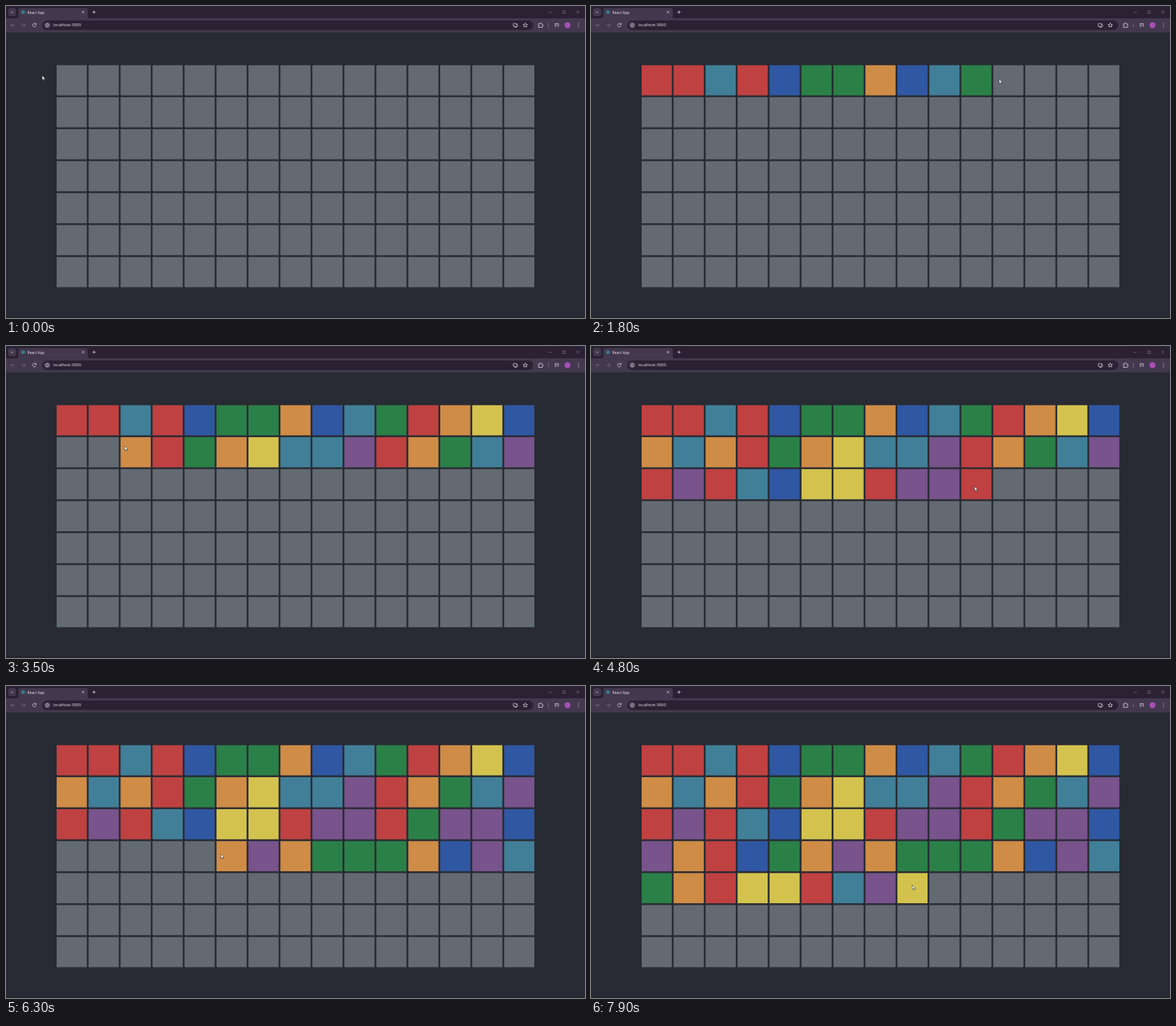
Animation of 800 by 431 pixels, one loop 8 s. Source, as an HTML page:

```html
<!DOCTYPE html>
<html lang="en">
<head>
<meta charset="utf-8">
<title>Hover grid</title>
<style>
  html, body { margin: 0; height: 100%; overflow: hidden; background: #282b33; }
  svg { display: block; width: 100vw; height: 100vh; }
  text { font-family: "Open Sans", "Noto Sans", sans-serif; fill: #efeaf2; }
  .icon { fill: none; stroke: #d6cfdc; stroke-width: .8; }
  .dim { stroke: #776d82; }
</style>
</head>
<body>
<svg viewBox="0 0 800 431">
  <rect width="800" height="431" fill="#282b33"/>
  <rect y="428.5" width="800" height="2.5" fill="#23262e"/>

  <!-- Browser window -->
  <rect width="800" height="18" fill="#2a2133"/>
  <rect y="17" width="800" height="19.5" fill="#43394f"/>
  <path d="M14 17Q17 17 17 14V6Q17 3 20 3H110Q113 3 113 6V14Q113 17 116 17Z" fill="#43394f"/>
  <rect x="3" y="3" width="11" height="11" rx="3" fill="#43394f"/>
  <path class="icon" d="M6.8 7.8l1.7 1.7 1.7-1.7"/>
  <circle cx="23.5" cy="8.5" r="2.6" fill="#37798c"/>
  <text x="29.6" y="10.5" font-size="5">React App</text>
  <path class="icon" d="M105 6.9l3.2 3.2m0-3.2l-3.2 3.2M119.3 8.5h4.6m-2.3-2.3v4.6"/>
  <path class="icon dim" d="M750 8.8h4M769.3 6.8h3.6v3.6h-3.6zM788.2 6.6l3.8 3.8m0-3.8l-3.8 3.8"/>
  <path class="icon dim" d="M12 26.5H7m2.3-2.3L7 26.5l2.3 2.3M21.5 26.5h5m-2.3-2.3l2.3 2.3-2.3 2.3"/>
  <path class="icon" d="M41.2 25.2a2.4 2.4 0 1 0 .2 2M41.6 23.7v1.8h-1.9"/>
  <rect x="50" y="20" width="678.5" height="13.2" rx="6.6" fill="#2a2133"/>
  <circle cx="57" cy="26.5" r="4.8" fill="#43394f"/>
  <circle class="icon" cx="57" cy="26.5" r="2.3"/>
  <path class="icon" d="M57 26.2v1.4M57 25v.6"/>
  <text x="65.3" y="28.4" font-size="5.7">localhost:3000</text>
  <path class="icon" d="M704 24.2h-3v4h6v-1.7M702.7 29.5h2.8M705.6 23.5v2.7m-1.3-1.2l1.3 1.2 1.3-1.2"/>
  <path class="icon" d="M717.5 23.4l.9 2 2.1.2-1.6 1.4.5 2.1-1.9-1.1-1.9 1.1.5-2.1-1.6-1.4 2.1-.2z"/>
  <path class="icon" d="M735.7 24.6h1.7q0-1.4 1-1.4t1 1.4h1.6v1.5q1.3 0 1.3 1t-1.3 1v1.4h-5.3v-1.7q1 0 1-.8t-1-.8z"/>
  <path class="icon dim" d="M749.5 23v7"/>
  <path class="icon" d="M758 24.4h5.6M758 26.3h3.2M758 28.2h2.2M762.7 29v-3h1.5"/>
  <circle cx="775.8" cy="26.4" r="4" fill="#a94fb8"/>
  <path d="M791 23.8v.01m0 2.6v.01m0 2.6v.01" stroke="#d6cfdc" stroke-width="1.2" stroke-linecap="round"/>

  <g id="grid"></g>
  <path id="cursor" d="M0 0V6.1L1.4 4.9 2.4 7.1 3.4 6.6 2.4 4.5H4.3Z" fill="#fff" stroke="#15171b" stroke-width=".5"/>
</svg>
<script>
const LOOP = 8000, STEP = 100, HOVER_DELAY = 30;
const COLS = 15, ROWS = 7;

// The page is laid out 1920 wide: 100px cells with a 3px margin, centred.
const SCALE = 800 / 1920;
const SIZE = 100 * SCALE, PITCH = 106 * SCALE;
const LEFT = 400 - COLS * PITCH / 2 + 3 * SCALE;
const TOP = 235.1 - ROWS * PITCH / 2 + 3 * SCALE;

const IDLE = '#646a72';
const PALETTE = {
  r: '#bf4141', t: '#417f98', b: '#3057a2', g: '#2b8048',
  o: '#cf8c46', y: '#d3c34e', p: '#78538c'
};
const COLORS = 'rrtrbggobtgroyb' + 'otorgoyttprogtp' + 'rprtbyyrpprgppb' +
  'porbgopogggobpt' + 'goryyrtpy';

// Key points of the pointer's zigzag, joined by a smooth curve.
const PATH = [
  [100, 50, 96], [1000, 287, 102], [1800, 564, 101], [2300, 716, 119],
  [2600, 646, 147], [3500, 164, 138], [3800, 84, 175], [4800, 530, 194],
  [5500, 706, 214], [6300, 297, 232], [7000, 84, 264], [7900, 444, 275]
].map(([t, x, y]) => ({ t, x, y }));

function slope(i, axis) {
  const a = PATH[Math.max(i - 1, 0)], b = PATH[Math.min(i + 1, PATH.length - 1)];
  return (b[axis] - a[axis]) / (b.t - a.t);
}

// Cubic Hermite interpolation between neighbouring key points.
function pointerAt(time) {
  const t = Math.max(time, PATH[0].t);
  const next = PATH.findIndex(p => p.t > t);
  const i = (next < 0 ? PATH.length - 1 : next) - 1;
  const a = PATH[i], b = PATH[i + 1], span = b.t - a.t;
  const k = Math.min((t - a.t) / span, 1), r = 1 - k;
  return ['x', 'y'].map(axis =>
    a[axis] * r * r * (1 + 2 * k) + b[axis] * k * k * (3 - 2 * k) +
    span * k * r * (r * slope(i, axis) - k * slope(i + 1, axis)));
}

const grid = document.getElementById('grid');
const cursor = document.getElementById('cursor');

const cells = Array.from({ length: COLS * ROWS }, (_, i) => {
  const node = document.createElementNS('http://www.w3.org/2000/svg', 'rect');
  const x = LEFT + i % COLS * PITCH, y = TOP + Math.floor(i / COLS) * PITCH;
  for (const [name, value] of Object.entries({ x, y, width: SIZE, height: SIZE }))
    node.setAttribute(name, value);
  grid.append(node);
  return { node, x, y, color: PALETTE[COLORS[i]] || IDLE, litAt: Infinity };
});

// A cell lights up shortly after the pointer first enters it and stays lit.
for (let t = 0; t < LOOP; t += 5) {
  const [x, y] = pointerAt(t);
  const cell = cells.find(c => x >= c.x && x < c.x + SIZE && y >= c.y && y < c.y + SIZE);
  if (cell) cell.litAt = Math.min(cell.litAt, t + HOVER_DELAY);
}

function draw() {
  const t = Math.floor(performance.now() % LOOP / STEP) * STEP;
  for (const c of cells) c.node.setAttribute('fill', t >= c.litAt ? c.color : IDLE);
  cursor.setAttribute('transform', `translate(${pointerAt(t)})`);
  requestAnimationFrame(draw);
}
draw();
</script>
</body>
</html>
```
